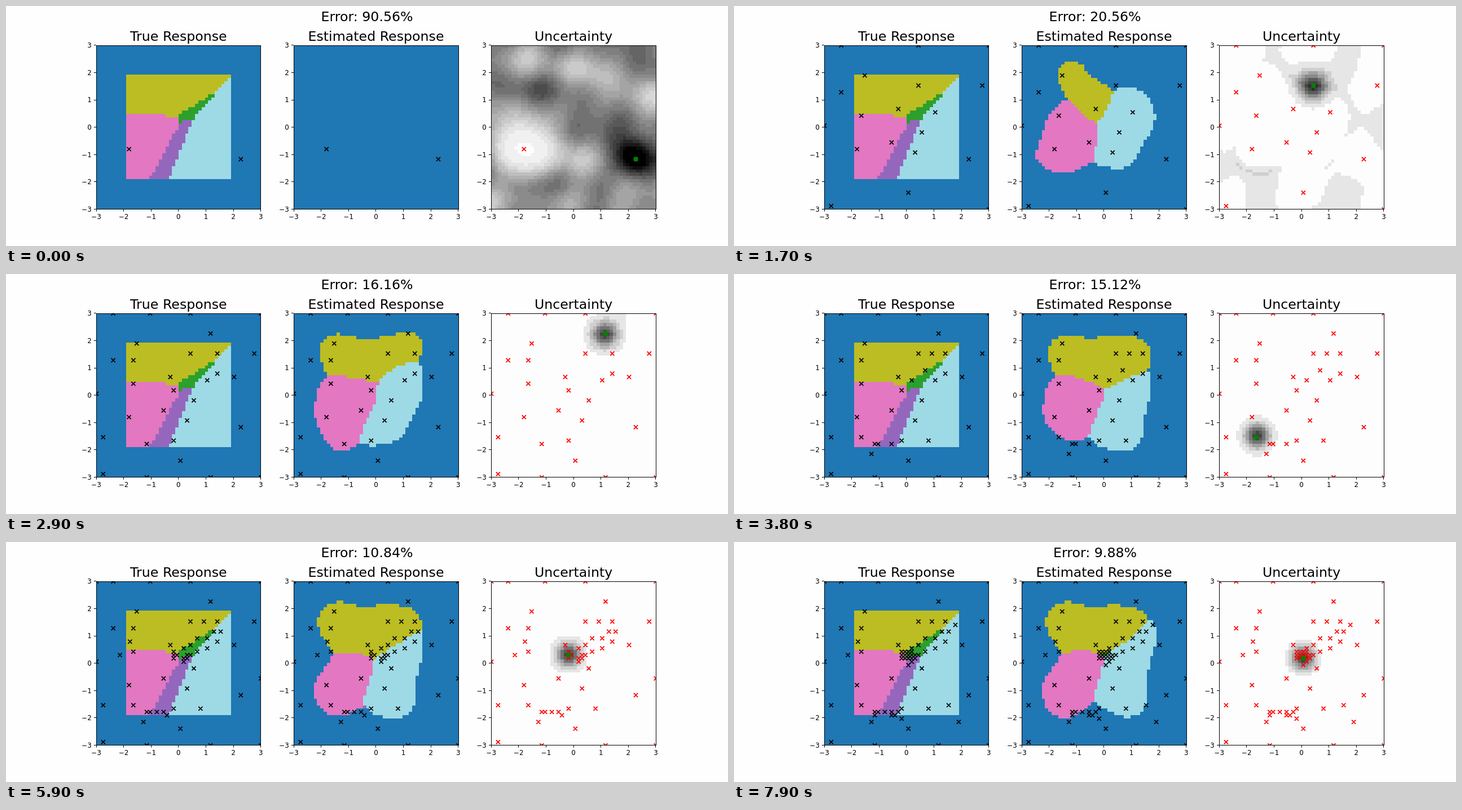
Recreate the animation shown at these times as an HTML page with a canvas. Size 1280 by 427 pixels, loop 8 s.

```html
<!DOCTYPE html>
<html lang="en">
<head>
<meta charset="utf-8">
<title>Active learning of a response map</title>
<style>
html, body { margin: 0; width: 100%; height: 100%; overflow: hidden; background: #fff; }
canvas { display: block; }
</style>
</head>
<body>
<canvas id="stage" width="1280" height="427"></canvas>
<script>
const ctx = document.getElementById('stage').getContext('2d');
const SIZE = 291.76, TOP = 69.8, LEFTS = [160, 510.1, 860.2];
const N = 50, CELL = 5.82, GRID = SIZE / (N - 1), PT = 1.185;
const STEP_MS = 100, STEPS = 80;
const BLUE = 0, GREEN = 1, PURPLE = 2, PINK = 3, OLIVE = 4, CYAN = 5;
// The entries of the 20-colour map that occur.
const COLORS = { 0: '#1f77b4', 4: '#2ca02c', 8: '#9467bd', 12: '#e377c2', 15: '#c7c7c7', 16: '#bcbd22', 19: '#9edae5' };

// Sampled grid points in order: column, row from the bottom.
const points = [
  9.7, 18, 43, 15, 12, 40, 47, 37, 2, 1, 25, 5, 28, 49, 22, 30, 0, 25,
  29, 23, 49, 49, 5, 49, 49, 0, 20, 20, 33, 29, 5, 35, 11, 28, 27, 17, 28, 37,
  15, 0, 34, 0, 2, 12, 16, 49, 23, 26, 36, 31, 41, 30, 23, 11, 11, 35, 36, 37, 15, 10, 34, 43,
  14, 7, 32, 37, 16, 10, 31, 11, 26, 29, 20, 10, 30, 32, 0, 49, 11, 12, 10, 31, 21, 9, 49, 20,
  35, 34, 18, 10, 24, 27, 28, 30, 26, 26, 26, 29, 27, 27,
  7, 27, 37, 34, 30, 28, 23, 28, 26, 25, 33, 32, 28, 27, 27, 26, 28, 27, 27, 26, 23, 27,
  25, 24, 37, 12, 23, 8, 39, 36, 15, 9, 20, 9, 22, 10, 40, 7];
// The last samples sweep a small block around the point where four classes meet.
for (let k = 0; k < 12; k++) points.push(23 + (k + 3) % 4, 28 - Math.floor(k / 4));

const samples = [];
for (let i = 0; i < points.length; i += 2) {
  const c = points[i], r = N - 1 - points[i + 1];
  samples.push({ c, r, label: truth(Math.round(c), r) });
}

const errors = [[0, 90.56], [1, 38.4], [7, 37.52], [17, 20.56], [29, 16.16], [48, 14], [59, 10.84], [79, 9.88]];

// A square split by straight lines, in cells from the top left.
function truth(c, r) {
  if (Math.min(c, r) < 9 || Math.max(c, r) > 40) return BLUE;
  if (c > Math.max(40.45 - .9 * (r - 9), 28.6 - .41 * (r - 23))) return CYAN;
  if (c >= 25 && c > 24.4 + 1.55 * (21 - r) && r <= (c < 26 ? 23 : 22)) return GREEN;
  if (r > 22 && c > 24.6 - .54 * (r - 24)) return PURPLE;
  return r > (c > 20 ? 21 : 20) ? PINK : OLIVE;
}

const bell = (a, b, width) => Math.exp(-((a.c - b.c) ** 2 + (a.r - b.r) ** 2) / (2 * width * width));

// Kernel vote of the known samples; crowded samples share their weight.
function vote(known) {
  const weights = known.map(a => 1 / known.reduce((sum, b) => sum + bell(a, b, 1.6), 0));
  const prior = known.some(s => s.label === BLUE) ? .36 : 0;
  return cell => {
    const scores = [prior, 0, 0, 0, 0, 0];
    let near = 0;
    known.forEach((s, i) => {
      const k = weights[i] * bell(s, cell, 5.72);
      scores[s.label] += k;
      near += k;
    });
    const [first, second] = [...scores].sort((a, b) => b - a);
    return { label: scores.indexOf(first), doubt: second / first, near };
  };
}

function random(seed) {
  return () => (seed = (seed * 16807) % 2147483647) / 2147483647;
}

// Smooth noise from a few random plane waves.
function makeNoise(seed) {
  const rand = random(seed);
  const waves = Array.from({ length: 10 }, () => {
    const angle = rand() * 2 * Math.PI, freq = .2 + rand() * .3;
    return [freq * Math.cos(angle), freq * Math.sin(angle), rand() * 2 * Math.PI];
  });
  return ({ c, r }) => waves.reduce((sum, [x, y, p]) => sum + Math.cos(x * c + y * r + p), 0) / 5;
}

// Dark where samples are far, classes compete, or the next sample falls.
function makeDarkness(step) {
  const noise = makeNoise(4321 + step * 977), next = samples[step + 1];
  const plain = .12 + .32 * Math.exp(-step / 12);
  const peakWidth = 2.2 + 2 / (1 + step / 10);
  return (cell, { doubt, near }) =>
    Math.exp(-2.6 * near) * (plain * (1 + .5 * noise(cell)) + .75 * doubt ** 3) + .75 * bell(cell, next, peakWidth);
}

function gray(dark, step) {
  const levels = step < 10 ? 20 : 11;
  const light = Math.max(0, Math.min(1, 1 - dark));
  const g = Math.round(Math.round(light * levels) / levels * 253);
  return `rgb(${g},${g},${g})`;
}

// Labels are spread over the colour map up to the highest one present.
const labelColor = (label, top) => COLORS[Math.min(19, Math.floor(20 * label / top))];

function drawCells(left, colors) {
  const xAt = c => Math.round(left + .5 + c * CELL), yAt = r => Math.floor(70 + r * CELL);
  colors.forEach((color, i) => {
    const c = i % N, r = Math.floor(i / N);
    ctx.fillStyle = color;
    ctx.fillRect(xAt(c), yAt(r), xAt(c + 1) - xAt(c), yAt(r + 1) - yAt(r));
  });
}

function drawSamples(left, count, color, markNext) {
  const h = 3 * PT;
  const place = s => [left + s.c * GRID + .3, TOP + s.r * GRID + .3];
  ctx.save();
  ctx.beginPath();
  ctx.rect(left, TOP, SIZE, SIZE);
  ctx.clip();
  ctx.beginPath();
  for (const s of samples.slice(0, markNext ? count - 1 : count)) {
    const [x, y] = place(s);
    ctx.moveTo(x - h, y - h); ctx.lineTo(x + h, y + h);
    ctx.moveTo(x - h, y + h); ctx.lineTo(x + h, y - h);
  }
  ctx.strokeStyle = color;
  ctx.lineWidth = 1.5 * PT;
  ctx.stroke();
  if (markNext) {
    const [x, y] = place(samples[count - 1]);
    ctx.beginPath();
    ctx.roundRect(x - 4, y - 4, 8, 8, 2);
    ctx.fillStyle = 'green';
    ctx.fill();
  }
  ctx.restore();
}

function label(text, x, y, size, align = 'center') {
  ctx.font = `${size * PT}px "DejaVu Sans", sans-serif`;
  ctx.textAlign = align;
  ctx.fillStyle = '#000';
  ctx.fillText(text, x, y);
}

function drawAxes(left, title) {
  const bottom = TOP + SIZE, tick = 3.5 * PT;
  const x0 = Math.round(left) + .5, x1 = Math.round(left + SIZE - .3) + .5;
  ctx.strokeStyle = '#000';
  ctx.lineWidth = 1;
  ctx.strokeRect(x0, 70.5, x1 - x0, 291);
  ctx.beginPath();
  for (let v = -3; v <= 3; v++) {
    const d = (v + 3) / 6 * SIZE, text = String(v).replace('-', '\u2212');
    const x = Math.round(left + d - .5) + .5, y = Math.round(bottom - d - .5) + .5;
    ctx.moveTo(x, bottom); ctx.lineTo(x, bottom + tick);
    ctx.moveTo(left, y); ctx.lineTo(left - tick, y);
    label(text, left + d, 379.3, 10);
    label(text, left - 2 * tick, bottom - d + 4.4, 10, 'right');
  }
  ctx.stroke();
  label(title, left + SIZE / 2, 61.7, 20);
}

function errorAt(step) {
  const i = errors.findLastIndex(([s]) => s <= step);
  const [s0, e0] = errors[i], [s1, e1] = errors[i + 1] || [s0 + 1, e0];
  return Math.round((e0 + (e1 - e0) * (step - s0) / (s1 - s0)) * 25) / 25;
}

const cells = Array.from({ length: N * N }, (_, i) => ({ c: i % N, r: Math.floor(i / N) }));
const trueColors = cells.map(({ c, r }) => labelColor(truth(c, r), CYAN));

function draw(step) {
  const votes = cells.map(vote(samples.slice(0, step + 1)));
  const darkness = makeDarkness(step);
  const labels = votes.map(v => v.label);
  const top = Math.max(...labels), flat = Math.min(...labels) === top;
  const panels = [
    ['True Response', trueColors],
    ['Estimated Response', labels.map(v => flat ? COLORS[0] : labelColor(v, top))],
    ['Uncertainty', cells.map((cell, i) => gray(darkness(cell, votes[i]), step))],
  ];
  ctx.fillStyle = '#fefefe';
  ctx.fillRect(0, 0, 1280, 427);
  label(`Error: ${errorAt(step).toFixed(2)}%`, 640, 27, 20);
  panels.forEach(([title, colors], i) => {
    drawCells(LEFTS[i], colors);
    drawSamples(LEFTS[i], step + 2, i < 2 ? '#000' : '#f00', i === 2);
    drawAxes(LEFTS[i], title);
  });
}

let shown = -1;
function tick() {
  const step = Math.floor(performance.now() / STEP_MS) % STEPS;
  if (step !== shown) draw(shown = step);
  requestAnimationFrame(tick);
}
tick();
</script>
</body>
</html>
```
